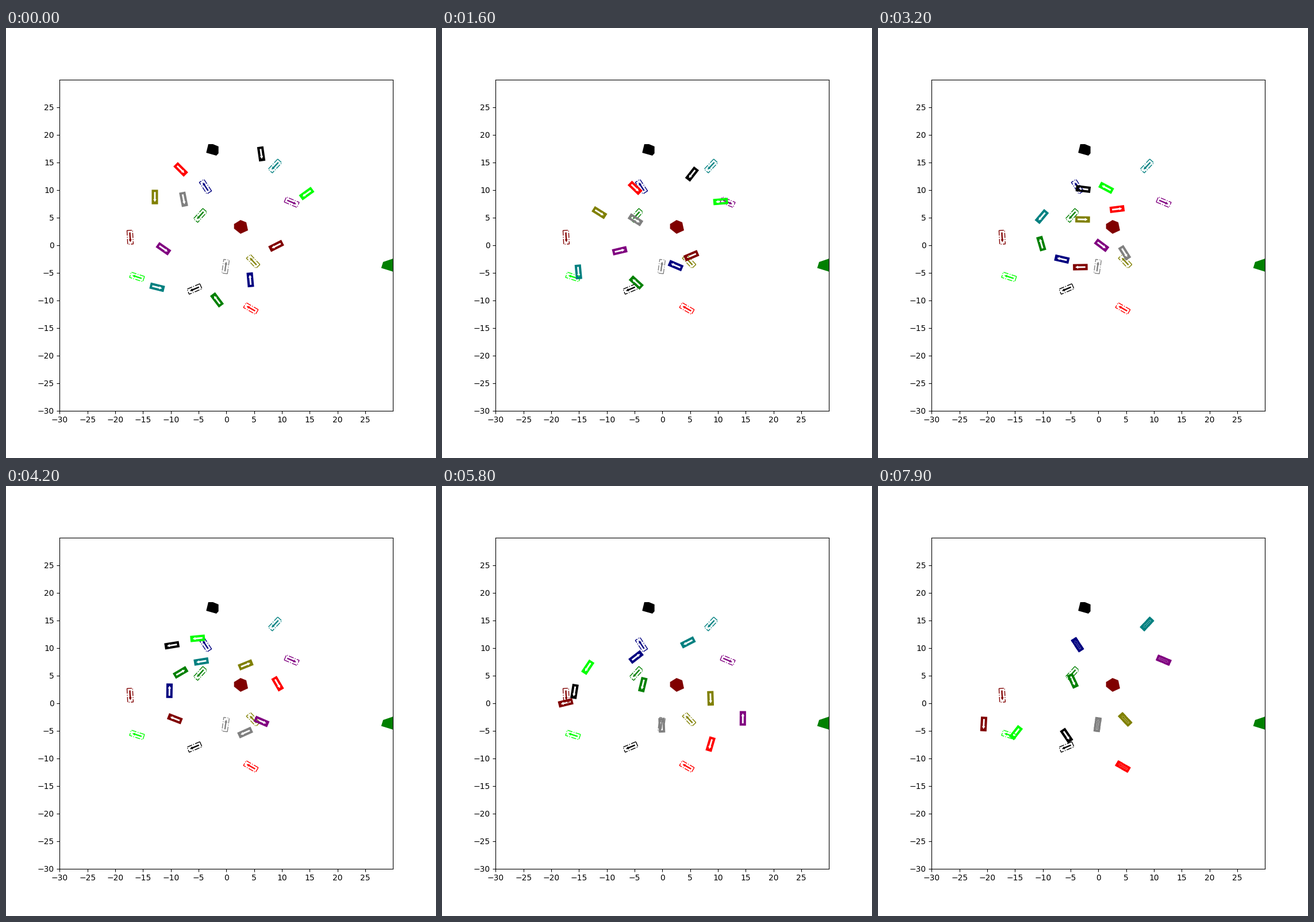
Recreate the animation shown at these times as a matplotlib script. Size 748 by 748 pixels, loop 8 s.

```python
import numpy as np
import matplotlib.pyplot as plt
from matplotlib.animation import FuncAnimation
from matplotlib.patches import PathPatch, Polygon
from matplotlib.path import Path

SIZE, DPI = 748, 100
FRAMES, INTERVAL = 80, 100
STOPS = [0, 31, 49, 66, 78]  # steps at which a route's poses are reached
RAMP = 15                    # steps spent speeding up from rest
LENGTH, WIDTH = 2.5, 1.0

fig, ax = plt.subplots(figsize=(SIZE / DPI, SIZE / DPI), dpi=DPI)
fig.subplots_adjust(left=0.1249)
ax.set(xlim=(-30, 30), ylim=(-30, 30),
       xticks=np.arange(-30, 30, 5), yticks=np.arange(-30, 30, 5))


def rect(length, width):
    return np.array([(-1, -1), (1, -1), (1, 1), (-1, 1)]) * (length / 2, width / 2)


def arrow(shaft, head, reach=0.85, neck=0.4):
    side = [(-reach, shaft), (neck, shaft), (neck, head), (reach, 0)]
    return np.array(side + [(x, -y) for x, y in side[2::-1]])


BOX, MARK = rect(LENGTH, WIDTH), arrow(0.1, 0.23)
BODY, SLOT = rect(LENGTH + 0.14, WIDTH + 0.14), arrow(0.15, 0.29, 0.91)


def world(x, y):
    """Stage pixels to axes units."""
    return np.array([(x / SIZE - 0.125) / 0.775 * 60 - 30,
                     (0.89 - y / SIZE) / 0.77 * 60 - 30])


def unit(deg):
    return np.array([np.cos(np.radians(deg)), np.sin(np.radians(deg))])


def place(shape, pos, deg):
    c, s = unit(deg)
    return shape @ np.array([(c, s), (-s, c)]) + pos


def travelled(step):
    """Distance in cruising steps, after a steady acceleration."""
    return step**2 / (2 * RAMP) if step < RAMP else step - RAMP / 2


def drive(a, b, t, sign):
    """Position and heading on a smooth curve between two poses."""
    p, q = world(*a[:2]), world(*b[:2])
    bend = (b[2] - a[2] + 180) % 360 - 180
    chord = np.hypot(*(q - p))
    creeping = chord < 1.5
    if creeping:
        t = 1 - (1 - t) ** 2
    pull = sign * chord / np.cos(np.radians(bend) / 4) ** 2
    m, n = pull * unit(a[2]), pull * unit(b[2])
    pos = (p + (3 * t**2 - 2 * t**3) * (q - p)
           + (t**3 - 2 * t**2 + t) * m + (t**3 - t**2) * n)
    if creeping:
        return pos, a[2] + bend * t
    vel = sign * (6 * (t - t**2) * (q - p)
                  + (3 * t**2 - 4 * t + 1) * m + (3 * t**2 - 2 * t) * n)
    return pos, np.degrees(np.arctan2(vel[1], vel[0]))


class Car:
    """Runs from start through two bends, then swings in to its goal."""

    def __init__(self, color, *route, goal, end=None, back=()):
        self.route, self.back = [*route, end or goal], back
        at = world(*goal[:2]), goal[2]
        ax.add_patch(Polygon(place(BOX, *at), fill=False, ec=color, lw=1,
                             ls="dashdot", zorder=1))
        ax.add_patch(Polygon(place(MARK, *at), color=color, lw=0.3, zorder=1))
        self.body = ax.add_patch(PathPatch(Path(BODY), fc=color, lw=0, zorder=2))

    def move(self, step):
        i = min(np.searchsorted(STOPS, step, side="right"), len(STOPS) - 1) - 1
        lo, hi = travelled(STOPS[i]), travelled(STOPS[i + 1])
        t = (travelled(step) - lo) / (hi - lo)
        at = drive(self.route[i], self.route[i + 1], t,
                   -1 if i in self.back else 1)
        # The slot winds the other way round, so it is left open.
        self.body.set_path(Path.make_compound_path(
            Path(place(BODY, *at), closed=False), 
            Path(place(SLOT, *at), closed=False)))


def block(color, *points):
    ax.add_patch(Polygon([world(*p) for p in points], fc=color, lw=0))


block("black", (352, 202), (360, 202), (369.7, 206), (369.7, 218),
      (366, 222), (348.3, 217))
block("maroon", (408, 334), (418, 338), (421, 352), (408, 358),
      (396.7, 349), (396.7, 341))
block("green", (652.7, 417.5), (656, 407), (690, 395.5), (690, 429))

# Poses are x, y in stage pixels and heading in degrees.
cars = [
    Car("black", (444, 219, -82), (357, 280, 173), (250, 303, 244),
        (249, 407, -31), goal=(328, 454, 203), end=(328, 434, -56)),
    Car("navy", (425, 438, 95), (320, 402, 167), (310, 314, 29),
        (353, 270, 92), goal=(347, 276, 123), back=[3]),
    Car("green", (367, 473, 127), (284, 375, 106), (345, 329, -43),
        (338, 365, 228), goal=(338, 326, 228), end=(339, 339, -65), back=[3]),
    Car("purple", (274, 384, -35), (389, 378, -37), (493, 427, -17),
        (495, 339, 134), goal=(497, 303, -23)),
    Car("olive", (259, 294, -90), (356, 333, -1), (452, 317, -63),
        (441, 408, 191), goal=(430, 406, 133)),
    Car("red", (304, 246, -45), (416, 315, 7), (479, 398, -106),
        (435, 487, 194), goal=(426, 488, 150)),
    Car("gray", (309, 298, -79), (429, 391, -58), (385, 419, 119),
        (382, 415, 82), goal=(382, 415, 82)),
    Car("lime", (523, 288, 216), (397, 278, 152), (285, 283, 216),
        (236, 362, 263), goal=(228, 433, 162), end=(240, 429, 232)),
    Car("teal", (263, 451, -14), (285, 328, 230), (388, 292, 210),
        (467, 243, 231), goal=(468, 240, 227), back=range(4)),
    Car("maroon", (470, 379, 207), (352, 416, 181), (251, 383, 148),
        (185, 403, 248), goal=(216, 364, -87), end=(184, 414, 267)),
]


def update(frame):
    for car in cars:
        car.move(max(0, frame - 1))
    return []


anim = FuncAnimation(fig, update, frames=FRAMES, interval=INTERVAL,
                     init_func=lambda: update(0), repeat=True, repeat_delay=0)
plt.show()
```
